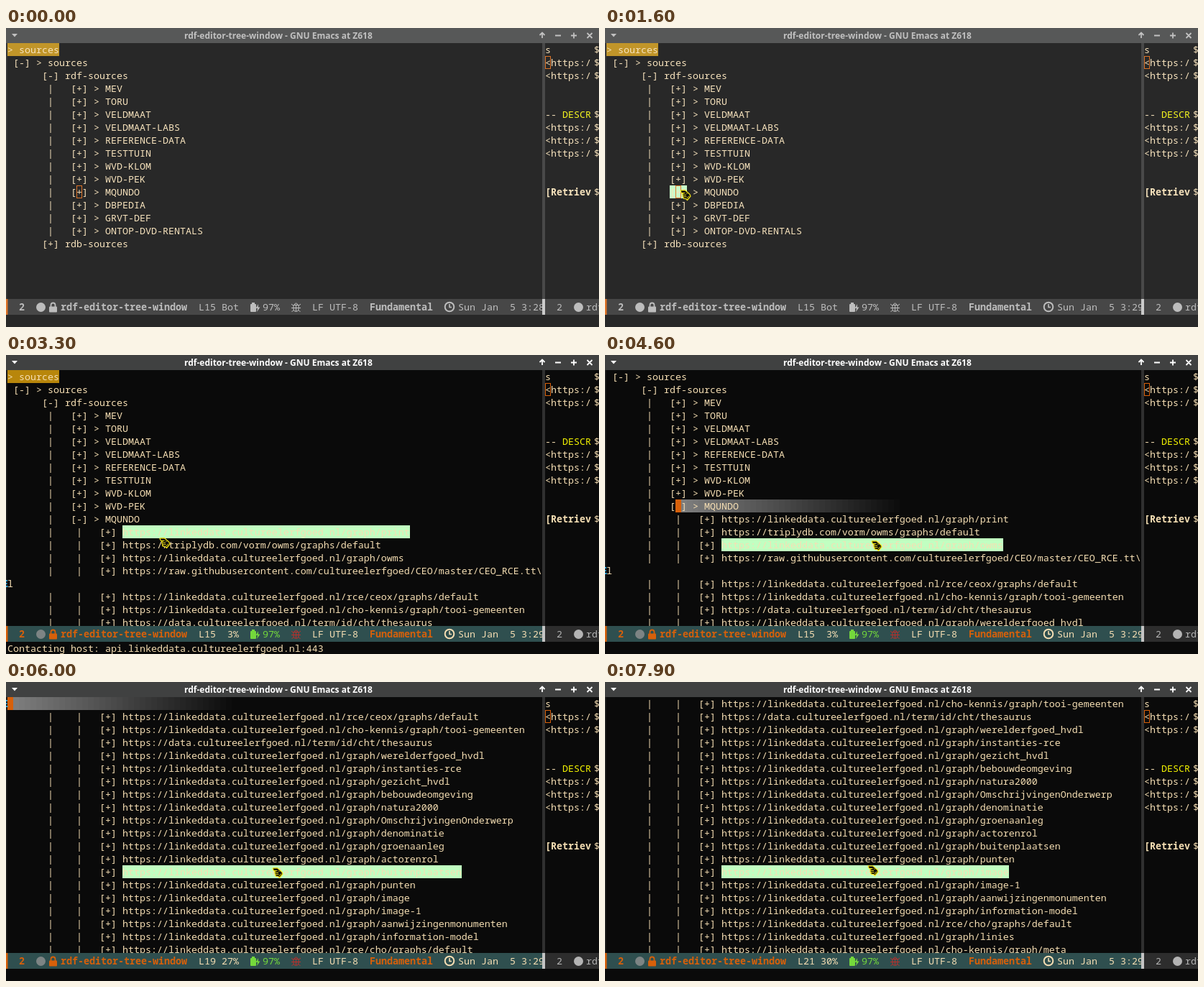
An HTML page for the animation above (8 s loop, 825 by 416 pixels).

```html
<!DOCTYPE html>
<html lang="en">
<head>
<meta charset="utf-8">
<title>Tree window</title>
<style>
  html, body { margin: 0; width: 100%; height: 100%; overflow: hidden; background: #0a0a0a; }
  svg { position: absolute; left: 0; top: 0; width: 825px; height: 416px; }
  text { font: 13.3333px "Noto Sans Mono", "DejaVu Sans Mono", monospace; white-space: pre; }
  text.b { font-weight: 700; }
  text.title { font: 700 12px "Noto Sans", "Open Sans", sans-serif; }
</style>
</head>
<body>
<svg id="stage" viewBox="0 0 825 416" xmlns="http://www.w3.org/2000/svg"></svg>
<script>
const LOOP = 8000, ROW = 18, TOP = 21, CELL = 8, LEFT = 2;
const BG = '#0a0a0a', INK = '#f5deb3', ORANGE = '#d7600a', GREEN = '#c1ffc1', GREY = '#b4b4b4';
const stage = document.getElementById('stage');

// Tree content
const SOURCES = ['MEV', 'TORU', 'VELDMAAT', 'VELDMAAT-LABS', 'REFERENCE-DATA', 'TESTTUIN',
  'WVD-KLOM', 'WVD-PEK', 'MQUNDO', 'DBPEDIA', 'GRVT-DEF', 'ONTOP-DVD-RENTALS'];
const OPEN = 8, HEAD = 11;   // opened source and its line
const HOST = 'https://linkeddata.cultureelerfgoed.nl/';
const graph = name => HOST + 'graph/' + name;
const URLS = [
  graph('print'),
  'https://triplydb.com/vorm/owms/graphs/default',
  graph('owms'),
  'https://raw.githubusercontent.com/cultureelerfgoed/CEO/master/CEO_RCE.tt\\',
  null,
  HOST + 'rce/ceox/graphs/default',
  HOST + 'cho-kennis/graph/tooi-gemeenten',
  'https://data.cultureelerfgoed.nl/term/id/cht/thesaurus',
  ...['werelderfgoed_hvdl', 'instanties-rce', 'gezicht_hvdl', 'bebouwdeomgeving', 'natura2000',
    'OmschrijvingenOnderwerp', 'denominatie', 'groenaanleg', 'actorenrol', 'buitenplaatsen',
    'punten', 'image', 'image-1', 'aanwijzingenmonumenten', 'information-model'].map(graph),
  HOST + 'rce/cho/graphs/default',
  graph('linies'),
  HOST + 'cho-kennis/graph/meta'
];
const WRAP = HEAD + 1 + URLS.indexOf(null);

const sourceLine = (name, sign) => `       |   [${sign}] > ${name}`;
const urlLine = url => url ? `       |    |   [+] ${url}` : 'l';
const intro = ['> sources', ' [-] > sources', '      [-] rdf-sources'];
const closedTree = [...intro, ...SOURCES.map(n => sourceLine(n, '+')), '      [+] rdb-sources'];
const openTree = [...closedTree.slice(0, HEAD), sourceLine(SOURCES[OPEN], '-'), ...URLS.map(urlLine)];

// Timeline: [ms, first visible line] and [ms, x, y]
const SCROLL = [[0, 0], [4600, 1], [4700, 3], [4800, 6], [5100, 7], [5200, 9], [5300, 12],
  [5800, 13], [5900, 14], [6000, 16], [6200, 18]];
const POINTER = [[300, 330, 41], [1100, 109, 229], [1300, 107, 226], [1500, 107, 226], [1600, 104, 225],
  [2900, 104, 225], [3000, 112, 224], [3100, 112, 224], [3200, 150, 240], [3300, 213, 254],
  [3500, 330, 281], [3900, 370, 258], [7800, 370, 258], [7900, 365, 255], [8000, 365, 255]];
const CURSOR_OFF = [[3000, 3500], [4100, 4600], [6700, 7200], [7700, 8000]];

const esc = s => s.replace(/&/g, '&amp;').replace(/</g, '&lt;').replace(/>/g, '&gt;');
const rect = (x, y, w, h, fill, extra = '') =>
  `<rect x="${x}" y="${y}" width="${w}" height="${h}" fill="${fill}" ${extra}/>`;
const text = (x, y, s, fill = INK, cls = '') => `<text x="${x}" y="${y}" fill="${fill}" class="${cls}">${esc(s)}</text>`;
const line = (d, color, w = 1.5) => `<path d="${d}" fill="none" stroke="${color}" stroke-width="${w}"/>`;
const dot = (x, y, r, fill) => `<circle cx="${x}" cy="${y}" r="${r}" fill="${fill}"/>`;
const rowY = row => TOP + row * ROW;
const colX = col => LEFT + col * CELL;
const box = (x, y) => rect(x + .5, y + .5, CELL - 1, ROW - 1, 'none', `stroke="${ORANGE}"`);

function pointerAt(t) {
  const i = POINTER.findIndex(p => p[0] > t);
  if (i < 1) return null;
  const [t0, x0, y0] = POINTER[i - 1], [t1, x1, y1] = POINTER[i];
  const k = (t - t0) / (t1 - t0);
  return [Math.round(x0 + (x1 - x0) * k), Math.round(y0 + (y1 - y0) * k)];
}

function hand([x, y]) {
  return `<g transform="translate(${x} ${y})" stroke-linejoin="round">
    <path d="M1 1.5 2 .8H7.5L14 6.5 15 9 10.500 14.500 8.500 12.500H6L4.500 11 5 10 3.800 8.500 4.500 7.500 3.500 6 4.500 5 7 4.500H2.500Z" fill="#0a0a0a" stroke="#f4e414" stroke-width="1.200"/>
    <path d="M4.500 7.300H9M5 9.800H9.500M9 4.500 10.500 6M10 12 13 8.500" fill="none" stroke="#f4e414"/></g>`;
}

function titleBar(active) {
  const c = active ? '#ffffff' : '#b8b8b8';
  return rect(0, 0, 825, TOP, '#404141') +
    `<path d="M8 8H16L12 12.500Z" fill="${c}"/>` +
    text(248, 15, 'rdf-editor-tree-window - GNU Emacs at Z618', c, 'title') +
    line('M746 14V7M742.500 10 746 6.500 749.500 10M764 10.500H772M786 10.500H794M790 6.500V14.500M808.500 7 815.500 14M815.500 7 808.500 14', c, 1.8);
}

function rightPane() {
  let s = rect(746, TOP, 4, 356, '#303030');
  const put = (row, str, cls) => { s += text(750, rowY(row) + 14, str, INK, cls) + text(818, rowY(row) + 14, '$'); };
  put(0, 's');
  [1, 2, 6, 7, 8].forEach(r => put(r, '<https:/'));
  put(5, '--');
  put(11, '[Retriev', 'b');
  return s + text(774, rowY(5) + 14, 'DESCR', '#f4f400') + box(750, rowY(1));
}

function modeLine(active, pos, clock) {
  const base = 393, main = active ? INK : GREY, key = active ? ORANGE : GREY;
  const power = active ? '#74d83c' : GREY, bug = active ? '#b8302c' : GREY;
  return rect(0, 377, 746, 22, active ? '#2f4f4f' : '#2d2d2d') + rect(0, 377, 2.5, 22, ORANGE) +
    text(18, base, '2', key, 'b') + dot(48.5, 388.5, 6.5, active ? '#7d8484' : GREY) +
    rect(60, 387.5, 11, 8, key, 'rx="1"') + line('M62.500 388V385.500A3 3 0 0 1 68.500 385.500V388', key, 1.8) +
    text(76, base, 'rdf-editor-tree-window', key, 'b') +
    text(268, base, pos, main) +
    rect(340, 384, 8, 11, power, 'rx="1"') + rect(342, 382, 4, 2, power) +
    `<path d="M351 384 347.500 390H350L349 395 353.500 388.500H350.800Z" fill="${power}"/>` +
    text(357, base, '97%', power) +
    line('M400 385.500H407V391A3.500 3.500 0 0 1 400 391ZM401.500 385A2 2 0 0 1 405.500 385M397 384 400 386.500M410 384 407 386.500M397 389.500H410M397.500 395 400.500 392M409.500 395 406.500 392M403.500 386V394', bug, 1) +
    text(426, base, 'LF UTF-8', main) + text(506, base, 'Fundamental', key, 'b') +
    `<circle cx="617" cy="388" r="6.300" fill="none" stroke="${main}" stroke-width="2"/>` +
    line('M617 384V388.500H620', main, 1.6) +
    `<g clip-path="url(#left)">${text(629, base, 'Sun Jan  5 ' + clock, main)}</g>` +
    rect(750, 377, 75, 22, '#2d2d2d') + rect(746, 377, 4, 22, '#c4c4c4') +
    text(766, base, '2', GREY) + dot(796.5, 388.5, 6.5, GREY) + text(807, base, 'rdf', GREY);
}

function beacon(age, x, y) {
  const shift = age < 500 ? 0 : (Math.floor((age - 500) / 100) + 1) * 6.5;
  let s = '';
  for (let i = 0; i + shift < 39; i++) {
    const v = Math.round(10 + 118 * (1 - (i + shift) / 39));
    s += rect(x + i * CELL, y, CELL, ROW, `rgb(${v},${v},${v})`);
  }
  return s;
}

function leftPane(t, active, opened, top, since) {
  const lines = opened ? openTree : closedTree;
  const pointer = pointerAt(t);
  const point = Math.max(HEAD, top);
  const cx = colX(point === HEAD ? 12 : 0), cy = rowY(point - top);
  let s = rect(0, TOP, 1.5, 356, '#222');

  if (top === 0) s += rect(LEFT, TOP, 72, ROW, '#b8860b');
  if (top > 0) s += beacon(t - since, cx, cy);
  if (!active && t >= 1200) s += rect(colX(11), rowY(HEAD), 24, ROW, GREEN);
  if (opened && pointer && pointer[0] >= 162) {
    const row = Math.floor((pointer[1] - TOP) / ROW);
    const url = URLS[top + row - HEAD - 1];
    if (url) s += rect(162, rowY(row), url.length * CELL, ROW, GREEN);
  }

  const cursorOn = !CURSOR_OFF.some(([a, b]) => t >= a && t < b);
  if (active && cursorOn) s += rect(cx, cy, CELL, ROW, ORANGE);
  lines.slice(top, top + 20).forEach((str, row) => {
    const i = top + row;
    if (active && cursorOn && i === point) {
      const col = (cx - LEFT) / CELL;
      if (!opened) s += text(cx, cy + 14, str[col], '#7a3004');
      str = str.slice(0, col) + ' ' + str.slice(col + 1);
    }
    s += text(LEFT, rowY(row) + 14, str);
    if (opened && i === WRAP) s += line(`M0 ${rowY(row) + 5}H2M0 ${rowY(row) + 9}H1.500M0 ${rowY(row) + 13}H2.500`, '#2fa4d8', 2);
  });
  if (!active) s += box(cx, cy);
  return `<g clip-path="url(#left)">${s}</g>`;
}

function render(t) {
  const active = t >= 2100, opened = t >= 2400;
  const [since, top] = SCROLL.filter(k => k[0] <= t).pop();
  const point = Math.max(HEAD, top);
  const percent = Math.max(3, Math.round(3 + (top - 1) * 1.6));
  const pos = opened ? `L${point + 4 - (point >= WRAP ? 1 : 0)} ${String(percent).padStart(2)}%` : 'L15 Bot';
  const pointer = pointerAt(t);
  stage.innerHTML =
    `<defs><clipPath id="left">${rect(0, TOP, 746, 378, '#000')}</clipPath></defs>` +
    rect(0, 0, 825, 416, BG) +
    leftPane(t, active, opened, top, since) + rightPane() +
    modeLine(t >= 2200, pos, t < 700 ? '3:28' : '3:29') +
    rect(0, 399, 825, 17, BG) +
    (t >= 2300 && t < 4600 ? text(LEFT, 413, 'Contacting host: api.linkeddata.cultureelerfgoed.nl:443') : '') +
    titleBar(active) +
    (active ? '' : rect(0, 0, 825, 416, '#fff', 'opacity=".12"')) +
    (pointer ? hand(pointer) : '');
}

let start = null, shown = -1;
function tick(now) {
  if (start === null) start = now;
  const t = Math.floor((now - start) % LOOP / 100) * 100;
  if (t !== shown) render(shown = t);
  requestAnimationFrame(tick);
}
render(0);
requestAnimationFrame(tick);
</script>
</body>
</html>
```
